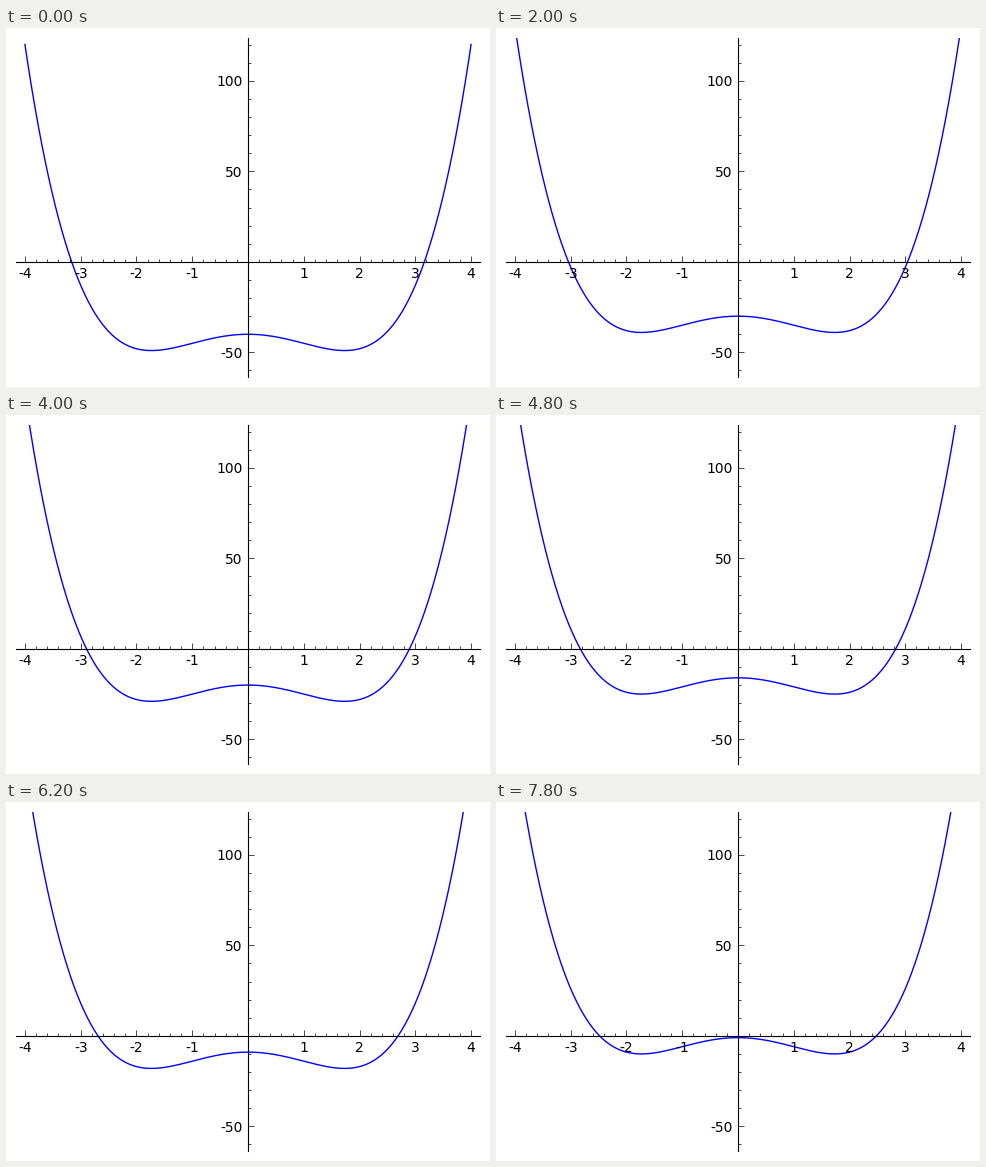
Animation of 484 by 359 pixels, one loop 8 s. Source, as a matplotlib script:

```python
import numpy as np
import matplotlib.pyplot as plt
from matplotlib.animation import FuncAnimation
from matplotlib.ticker import FuncFormatter, MultipleLocator

W, H, DPI = 484, 359, 100
MARGIN = 10
FRAMES, STEP_MS = 40, 200

plt.rcParams.update({"font.family": "DejaVu Sans", "font.size": 10})


def label(value, _):
    return "" if abs(value) < 1e-9 else f"{value:.0f}"


def setup_axis(axis, major, minor):
    axis.set_major_locator(MultipleLocator(major))
    axis.set_minor_locator(MultipleLocator(minor))
    axis.set_major_formatter(FuncFormatter(label))


fig = plt.figure(figsize=(W / DPI, H / DPI), dpi=DPI, facecolor="white")
ax = fig.add_axes([MARGIN / W, MARGIN / H, 1 - 2 * MARGIN / W, 1 - 2 * MARGIN / H])
ax.set_xlim(-4.16, 4.16)
ax.set_ylim(-63.6, 123.6)
ax.set_axisbelow(False)

for side in ("top", "right"):
    ax.spines[side].set_visible(False)
for side in ("left", "bottom"):
    ax.spines[side].set_position(("data", 0))
    ax.spines[side].set_linewidth(0.8)

setup_axis(ax.xaxis, 1, 0.2)
setup_axis(ax.yaxis, 50, 10)
ax.tick_params(which="major", direction="in", length=4, width=0.5, pad=4)
ax.tick_params(which="minor", direction="in", length=2, width=0.5)

x = np.linspace(-4, 4, 401)
quartic = x**4 - 6 * x**2
curve, = ax.plot(x, quartic - 40, color="#0000ff", linewidth=1)


def update(i):
    curve.set_ydata(quartic - 40 + i)
    return curve,


anim = FuncAnimation(fig, update, frames=FRAMES, interval=STEP_MS,
                     repeat=True, repeat_delay=0)
plt.show()
```
